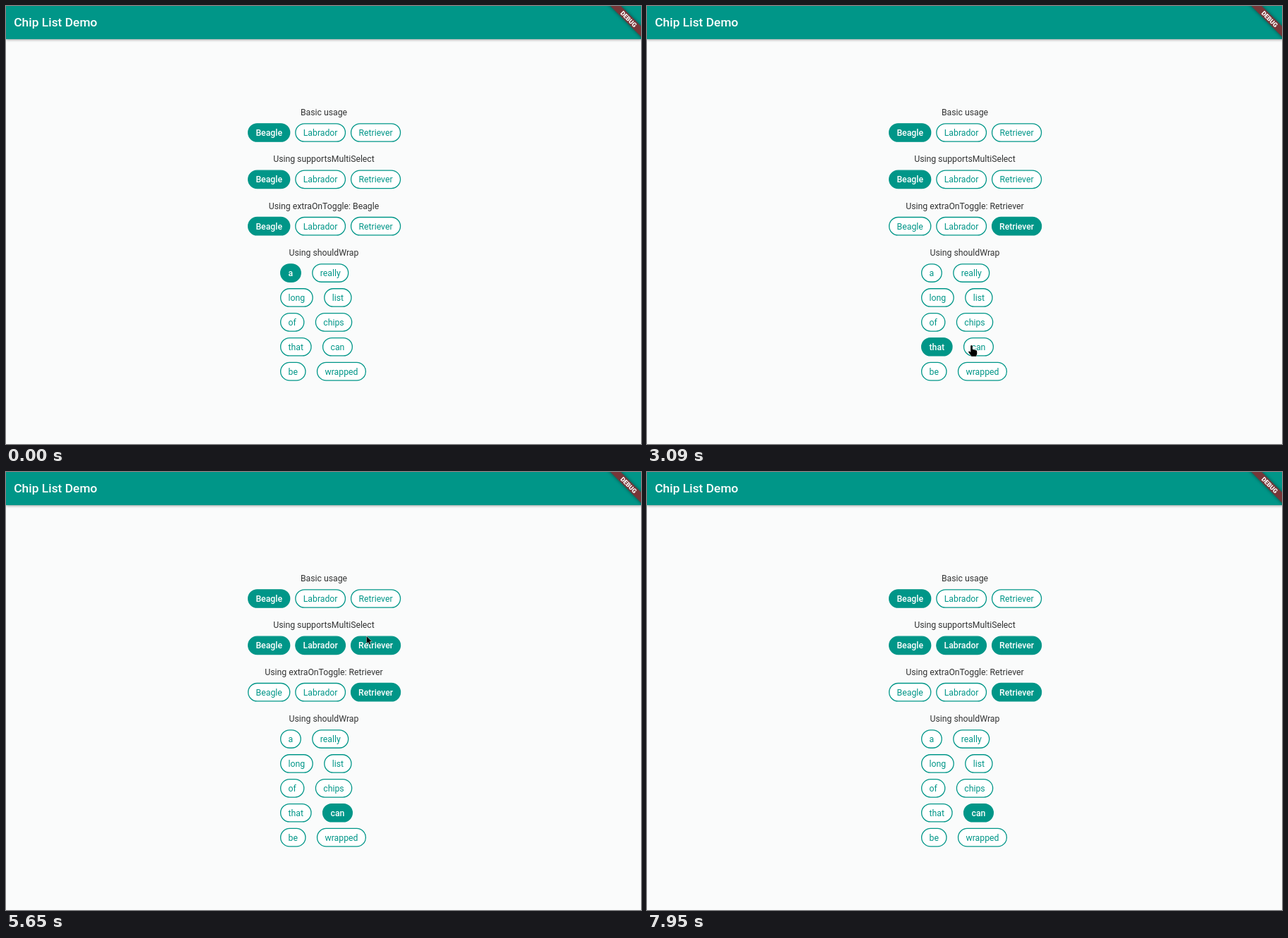
These frames come from a looping animation (901 px wide and 621 px high, 8620 ms). An HTML page:

```html
<!DOCTYPE html>
<html lang="en">
<head>
<meta charset="utf-8">
<title>Chip List Demo</title>
<style>
  html, body { margin: 0; width: 100%; height: 100%; overflow: hidden; background: #fafbfb; }
  .bar {
    position: absolute; top: 0; left: 0; width: 901px; height: 46.8px;
    background: #009688; box-shadow: 0 1px 3.5px rgba(0, 0, 0, .38);
  }
  svg { position: absolute; top: 0; left: 0; font: 12.25px Roboto, sans-serif; }
  .title { font-size: 17.4px; font-weight: 500; fill: #fff; }
  .heading { fill: #323333; text-anchor: middle; }
  .chip rect { stroke: #009688; stroke-width: 1.3; }
  .chip text { text-anchor: middle; fill: #009688; }
  .chip.on text { fill: #fff; font-weight: 500; }
  .ribbon rect { fill: #783638; filter: drop-shadow(0 0 2.5px rgba(0, 0, 0, .5)); }
  .ribbon text { fill: #fff; font-size: 8.9px; font-weight: 900; text-anchor: middle; }
  .cursor path { fill: #000; stroke: #fff; stroke-width: .9; paint-order: stroke; }
</style>
</head>
<body>
<div class="bar"></div>
<svg width="901" height="621" viewBox="0 0 901 621">
  <text class="title" x="11.2" y="28.6">Chip List Demo</text>
  <g class="ribbon" transform="translate(901 0) rotate(45)">
    <rect x="-40" y="20.3" width="80" height="10.4"/>
    <text x=".7" y="28.7">DEBUG</text>
  </g>
  <g id="chips"></g>
  <g id="cursor" class="cursor">
    <path id="arrow" d="M0,0v10.5l2.4-2.2 1.7,3.8 1.8-.8-1.7-3.7h3.3z"/>
    <path id="hand" d="M-1.3,.5q1.3-1.5 2.6,0v5l5,1.2q1.6,.5 1.5,2.2v3l-1.2,3.6h-6.6l-4-5.4q-.8-1.6 .8-2l1.9,1.6z"/>
  </g>
</svg>
<script>
const LOOP = 8620, FADE = 195, DWELL = 90;
const TOP = 179.5, GROUP_STEP = 66.35, ROW_STEP = 34.9;
const CHIP_HEIGHT = 26.7, STROKE = 1.3, PADDING = 11.6;
const byId = id => document.getElementById(id);

function add(parent, tag, attrs, text = '') {
  const el = document.createElementNS('http://www.w3.org/2000/svg', tag);
  for (const key in attrs) el.setAttribute(key, attrs[key]);
  el.textContent = text;
  return parent.appendChild(el);
}

const dogRow = { labels: ['Beagle', 'Labrador', 'Retriever'], columns: 3, left: 343, gap: 6.8 };
const groups = [
  { ...dogRow, title: 'Basic usage' },
  { ...dogRow, title: 'Using supportsMultiSelect', multi: true },
  { ...dogRow, title: 'Using extraOnToggle: ', echo: true },
  {
    labels: 'a really long list of chips that can be wrapped'.split(' '),
    columns: 2, left: 389, gap: 15.3, title: 'Using shouldWrap'
  }
];

// The pointer's tour: free points, or chips [group, index] tapped at a given time.
const tour = [
  { at: 190, x: 850, y: 366 },
  { at: 640, chip: [2, 1], tap: 720 },
  { at: 1150, x: 557, y: 325 },
  { at: 1430, chip: [2, 2], tap: 1500 },
  { at: 1780, x: 522, y: 395 },
  { at: 2000, chip: [3, 1], tap: 2150, dx: 12 },
  { at: 2330, chip: [3, 6], tap: 2380, dy: -3 },
  { at: 2750, chip: [3, 6] },
  { at: 3070, chip: [3, 7], tap: 3240, dx: -10, dy: -2 },
  { at: 3650, x: 545, y: 308 },
  { at: 4260, chip: [1, 1], tap: 4400 },
  { at: 4840, chip: [1, 2], tap: 5370, dx: -3, dy: 3 },
  { at: 6090, chip: [0, 1], tap: 6160, dx: 30, dy: -4 },
  { at: 6600, chip: [0, 2], tap: 6700 },
  { at: 7260, chip: [0, 0], tap: 7380 },
  { at: 7920, x: 688, y: 532 }
];

function layChip(label, x, y) {
  const node = add(byId('chips'), 'g', { class: 'chip' });
  const box = add(node, 'rect', {});
  const text = add(node, 'text', { y: y + 4.4 }, label);
  const width = text.getComputedTextLength() + 2 * PADDING;
  const height = CHIP_HEIGHT - STROKE;
  text.setAttribute('x', x + width / 2);
  const shape = {
    x: x + STROKE / 2, y: y - height / 2, width: width - STROKE, height, rx: height / 2
  };
  for (const key in shape) box.setAttribute(key, shape[key]);
  return { label, node, box, width, x: x + width / 2, y };
}

groups.forEach((g, n) => {
  const top = TOP + n * GROUP_STEP;
  g.heading = add(byId('chips'), 'text', { class: 'heading', x: 451, y: top - 24.4 }, g.title);
  g.taps = tour.filter(s => s.tap && s.chip[0] === n).map(s => ({ time: s.tap, index: s.chip[1] }));
  let x;
  g.chips = g.labels.map((label, i) => {
    if (i % g.columns === 0) x = g.left;
    const chip = layChip(label, x, top + Math.floor(i / g.columns) * ROW_STEP);
    x += chip.width + g.gap;
    return chip;
  });
});

const stops = tour.flatMap(({ at, tap, chip, x, y, dx = 0, dy = 0 }) => {
  const spot = chip ? groups[chip[0]].chips[chip[1]] : { x, y };
  const stop = { at, x: spot.x + dx, y: spot.y + dy };
  return tap ? [stop, { ...stop, at: tap + DWELL }] : [stop];
});

// The first chip starts selected; filling is quick, emptying eases out.
function chipState(g, i, t) {
  let on = i === 0, since = -FADE;
  for (const { time, index } of g.taps) {
    if (time > t) break;
    const next = index === i || Boolean(g.multi && on);
    if (next !== on) since = time;
    on = next;
  }
  const p = Math.min(1, (t - since) / FADE);
  return { on, level: on ? Math.min(1, p * 3) : 1 - p * p };
}

function tint(level) {
  const mix = c => Math.round(255 + (c - 255) * level);
  return `rgb(${mix(0)},${mix(150)},${mix(136)})`;
}

function drawChips(t) {
  for (const g of groups) {
    let selected;
    g.chips.forEach((chip, i) => {
      const { on, level } = chipState(g, i, t);
      chip.node.classList.toggle('on', on);
      chip.box.style.fill = tint(level);
      if (on) selected = chip.label;
    });
    if (g.echo) g.heading.textContent = g.title + selected;
  }
}

function pointerAt(t) {
  const n = stops.findIndex(s => s.at > t);
  if (n < 1) return null;
  const a = stops[n - 1], b = stops[n];
  const p = (t - a.at) / (b.at - a.at);
  const eased = p * p * (3 - 2 * p);
  return { x: a.x + (b.x - a.x) * eased, y: a.y + (b.y - a.y) * eased };
}

const overChip = ({ x, y }) => groups.some(g => g.chips.some(
  c => Math.abs(x - c.x) < c.width / 2 && Math.abs(y - c.y) < 12.5
));

const show = (id, visible) => { byId(id).style.display = visible ? '' : 'none'; };

function drawCursor(t) {
  const tip = pointerAt(t);
  show('cursor', tip);
  if (!tip) return;
  const over = overChip(tip);
  byId('cursor').setAttribute('transform', `translate(${tip.x} ${tip.y})`);
  show('hand', over);
  show('arrow', !over);
}

const start = performance.now();
function frame() {
  const t = (performance.now() - start) % LOOP;
  drawChips(t);
  drawCursor(t);
  requestAnimationFrame(frame);
}
frame();
</script>
</body>
</html>
```
